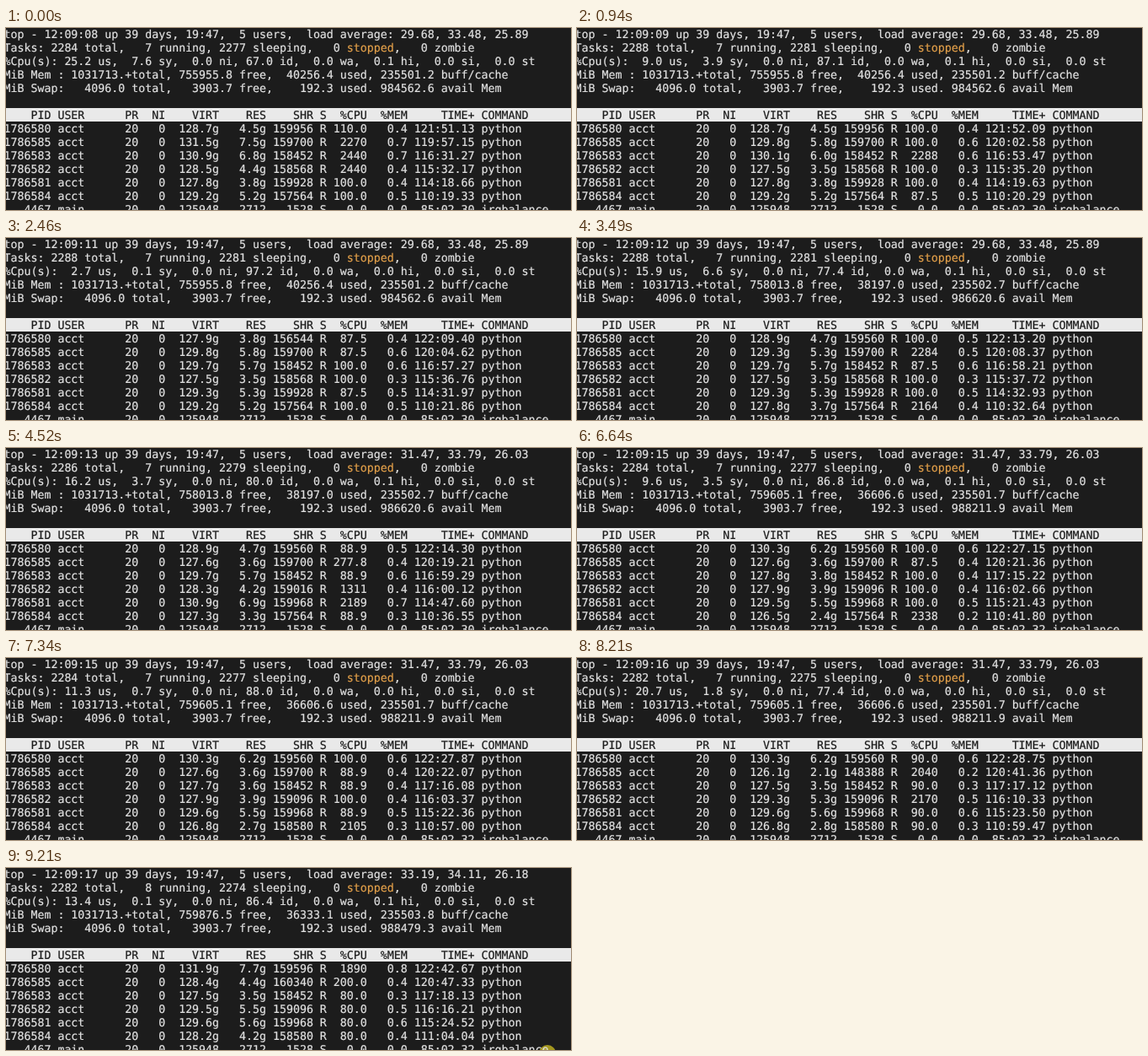
An HTML page for the animation above (9270 ms loop, 671 by 216 pixels).

```html
<!DOCTYPE html>
<html lang="en">
<head>
<meta charset="utf-8">
<title>Process monitor</title>
<style>
  html, body { margin: 0; width: 100%; height: 100%; overflow: hidden; background: #1c1c1c; }
  svg { display: block; width: 671px; height: 216px; }
  text {
    font: 13.288px "DejaVu Sans Mono", monospace;
    fill: #e2e2e2;
    stroke: #e2e2e2;
    stroke-width: 0.2;
    text-rendering: geometricPrecision;
    white-space: pre;
  }
  .head { fill: #1c1c1c; stroke: #1c1c1c; }
  .warn { fill: #e3a04a; stroke: #e3a04a; }
</style>
</head>
<body>
<svg id="screen" viewBox="0 0 671 216">
  <rect y="95" width="671" height="16" fill="#e9e9e9"/>
  <circle id="pointer" cx="643" cy="220" r="10" fill="#a3961f" visibility="hidden"/>
</svg>
<script>
const LOOP = 9270;
const LINE = 16;

// Refresh times: first, last, count
const RUNS = [
  [80, 940, 14], [1040, 1930, 12], [2010, 2460, 7], [2530, 2870, 5],
  [2950, 3820, 14], [3900, 4520, 11], [4600, 4760, 3], [4840, 5710, 13],
  [5780, 6640, 12], [6700, 6700, 1], [6780, 7700, 13], [7780, 8210, 6],
  [8310, 8630, 5], [8710, 9210, 9]
];
const times = [0];
for (const [first, last, count] of RUNS) {
  for (let i = 0; i < count; i++) {
    times.push(first + Math.round((last - first) * i / Math.max(1, count - 1) / 10) * 10);
  }
}

const KEY_TIMES = [0, 940, 2460, 4520, 6640, 8210, 9210];
const keySteps = KEY_TIMES.map(t => times.indexOf(t));

// Per key: resident GiB, CPU time, CPU percent. shr maps a key to a new value.
const PROCESSES = [
  { pid: 1786580, gap: 124.14, shr: { 0: 159956, 2: 156544, 3: 159560, 6: 159596 },
    keys: '4.52 121:51.13 110|4.52 121:52.09 100|3.80 122:09.40 87.5|4.74 122:14.30 88.9|6.19 122:27.15 100|6.19 122:28.75 90|7.74 122:42.67 1890' },
  { pid: 1786585, gap: 124.05, shr: { 0: 159700, 5: 148388, 6: 160340 },
    keys: '7.48 119:57.15 2270|5.78 120:02.58 100|5.78 120:04.62 87.5|3.58 120:19.21 277.8|3.58 120:21.36 87.5|2.08 120:41.36 2040|4.38 120:47.33 200' },
  { pid: 1786583, gap: 124.05, shr: { 0: 158452 },
    keys: '6.84 116:31.27 2440|6.03 116:53.47 2288|5.67 116:57.27 100|5.67 116:59.29 88.9|3.78 117:15.22 100|3.48 117:17.12 90|3.48 117:18.13 80' },
  { pid: 1786582, gap: 124.05, shr: { 0: 158568, 3: 159016, 4: 159096 },
    keys: '4.43 115:32.17 2440|3.48 115:35.20 100|3.48 115:36.76 100|4.23 116:00.12 1311|3.88 116:02.66 100|5.28 116:10.33 2170|5.48 116:16.21 80' },
  { pid: 1786581, gap: 124.05, shr: { 0: 159928, 3: 159968 },
    keys: '3.78 114:18.66 100|3.78 114:19.63 100|5.28 114:31.97 87.5|6.88 114:47.60 2189|5.48 115:21.43 100|5.58 115:23.50 90|5.58 115:24.52 80' },
  { pid: 1786584, gap: 124.05, shr: { 0: 157564, 5: 158580 },
    keys: '5.18 110:19.33 100|5.18 110:20.29 87.5|5.18 110:21.86 100|3.28 110:36.55 88.9|2.43 110:41.80 2338|2.78 110:59.47 90|4.18 111:04.04 80' }
];

// Per key: user, system, idle, hardware interrupts
const CPU_KEYS = [
  [25.2, 7.6, 67, 0.1], [9, 3.9, 87.1, 0.1], [2.7, 0.1, 97.2, 0], [16.2, 3.7, 80, 0.1],
  [9.6, 3.5, 86.8, 0.1], [20.7, 1.8, 77.4, 0], [13.4, 0.1, 86.4, 0.1]
];
const TASKS = [2284, 2288, 2288, 2286, 2284, 2282, 2282];

// Values held from a given time on
const LOAD = [[0, '29.68, 33.48, 25.89'], [3900, '31.47, 33.79, 26.03'], [8710, '33.19, 34.11, 26.18']];
const MEMORY = [
  [0, '755955.8', '40256.4', '235501.2', '984562.6'],
  [2950, '758013.8', '38197.0', '235502.7', '986620.6'],
  [5780, '759605.1', '36606.6', '235501.7', '988211.9'],
  [8710, '759876.5', '36333.1', '235503.8', '988479.3']
];

const rand = (a, b) => {
  const x = Math.sin(a * 12.9898 + b * 78.233) * 43758.5453;
  return x - Math.floor(x);
};
const held = (table, t) => table.filter(row => row[0] <= t).pop().slice(1);
const num = (value, width) => value.toFixed(1).padStart(width);
const percent = v => (v < 1000 ? v.toFixed(1) : v.toFixed(0)).padStart(6);
const seconds = clock => {
  const [m, s] = clock.split(':').map(Number);
  return m * 60 + s;
};
const clock = total => {
  const cs = Math.round(total * 100);
  const sec = (cs % 6000 / 100).toFixed(2).padStart(5, '0');
  return `${Math.floor(cs / 6000)}:${sec}`;
};

for (const p of PROCESSES) {
  let shr;
  p.keys = p.keys.split('|').map((key, k) => {
    const [res, time, cpu] = key.split(' ');
    shr = p.shr[k] ?? shr;
    return { res: +res, time: seconds(time), cpu: +cpu, shr };
  });
}

// Single-core pace with one many-core burst between two keys
function sample(p, step) {
  const exact = keySteps.indexOf(step);
  if (exact >= 0) return p.keys[exact];
  const next = keySteps.findIndex(s => s > step);
  const a = p.keys[next - 1], b = p.keys[next];
  const count = keySteps[next] - keySteps[next - 1];
  const k = step - keySteps[next - 1];
  const span = (KEY_TIMES[next] - KEY_TIMES[next - 1]) / 1000;
  const extra = Math.max(0, b.time - a.time - span);
  const burst = Math.min(count, Math.max(extra > 0.5 ? 1 : 0, Math.round(extra * count / (21 * span))));
  let start = Math.floor(rand(p.pid % 100, next) * (count - burst + 1));
  if (b.cpu > 1000) start = count - burst;
  if (a.cpu > 1000) start = 0;
  const part = burst ? Math.min(1, Math.max(0, (k - start) / burst)) : k / count;
  const hot = k > start && k <= start + burst;
  const r = rand(step, p.pid % 100);
  const ticks = 8 + Math.floor(rand(step, 1) * 2);
  return {
    res: a.res + (b.res - a.res) * part,
    time: a.time + (b.time - a.time - extra) * k / count + extra * part,
    cpu: hot ? 1900 + 500 * r : r < 0.4 ? 100 * (ticks - 1) / ticks : 100,
    shr: part > 0.5 ? b.shr : a.shr
  };
}

function cpuShares(step, rows) {
  const exact = keySteps.indexOf(step);
  if (exact >= 0) return CPU_KEYS[exact];
  const total = rows.reduce((sum, row) => sum + row.cpu, 0) / 215;
  const sys = total > 5 ? total * (0.05 + 0.25 * rand(step, 2)) : 0.1;
  const irq = total > 5 && rand(step, 3) > 0.3 ? 0.1 : 0;
  return [total - sys, sys, 100 - total - irq, irq];
}

const row = (pid, user, virt, res, shr, state, cpu, mem, time, command) =>
  String(pid).padStart(7) + ' ' + user.padEnd(10) + '20   0' + virt.padStart(8) +
  res.padStart(7) + String(shr).padStart(7) + ' ' + state + cpu + mem.padStart(6) +
  time.padStart(10) + ' ' + command;

function screenAt(step) {
  const t = times[step];
  const rows = PROCESSES.map(p => sample(p, step));
  const [us, sy, id, hi] = cpuShares(step, rows);
  const [free, used, cache, avail] = held(MEMORY, t);
  const second = String(Math.floor(8.65 + t / 1000)).padStart(2, '0');
  const key = keySteps.filter(s => s <= step).length - 1;
  const running = step === keySteps[6] ? 8 : 7;
  return [
    `top - 12:09:${second} up 39 days, 19:47,  5 users,  load average: ${held(LOAD, t)[0]}`,
    `Tasks: ${TASKS[key]} total,   ${running} running, ${TASKS[key] - running} sleeping,   0 <tspan class="warn">stopped</tspan>,   0 zombie`,
    `%Cpu(s):${num(us, 5)} us,${num(sy, 5)} sy,  0.0 ni,${num(id, 5)} id,  0.0 wa,${num(hi, 5)} hi,  0.0 si,  0.0 st`,
    `MiB Mem : 1031713.+total, ${free} free,  ${used} used, ${cache} buff/cache`,
    `MiB Swap:   4096.0 total,   3903.7 free,    192.3 used. ${avail} avail Mem`,
    '',
    '    PID USER      PR  NI    VIRT    RES    SHR S  %CPU  %MEM     TIME+ COMMAND',
    ...rows.map((r, i) => row(PROCESSES[i].pid, 'acct', num(r.res + PROCESSES[i].gap, 0) + 'g',
      num(r.res, 0) + 'g', r.shr, 'R', percent(r.cpu), num(r.res / 10.075, 0), clock(r.time), 'python')),
    row(4467, 'main', '125948', '2712', 1528, 'S', percent(0), '0.0',
      t < 5300 ? '85:02.30' : '85:02.32', 'irqbalance')
  ];
}

const svg = document.getElementById('screen');
const pointer = document.getElementById('pointer');
const screens = times.map((_, step) => screenAt(step));
const lines = screens[0].map((_, i) => {
  const text = document.createElementNS('http://www.w3.org/2000/svg', 'text');
  text.setAttribute('x', -2.5);
  text.setAttribute('y', i * LINE + 12);
  if (i === 6) text.setAttribute('class', 'head');
  return svg.appendChild(text);
});

let shown = -1;
function draw() {
  const t = (performance.now() - begin) % LOOP;
  let step = times.length - 1;
  while (times[step] > t) step--;
  if (step !== shown) {
    shown = step;
    lines.forEach((line, i) => { line.innerHTML = screens[step][i]; });
    pointer.setAttribute('visibility', times[step] >= 9140 ? 'visible' : 'hidden');
  }
  requestAnimationFrame(draw);
}
const begin = performance.now();
draw();
</script>
</body>
</html>
```
